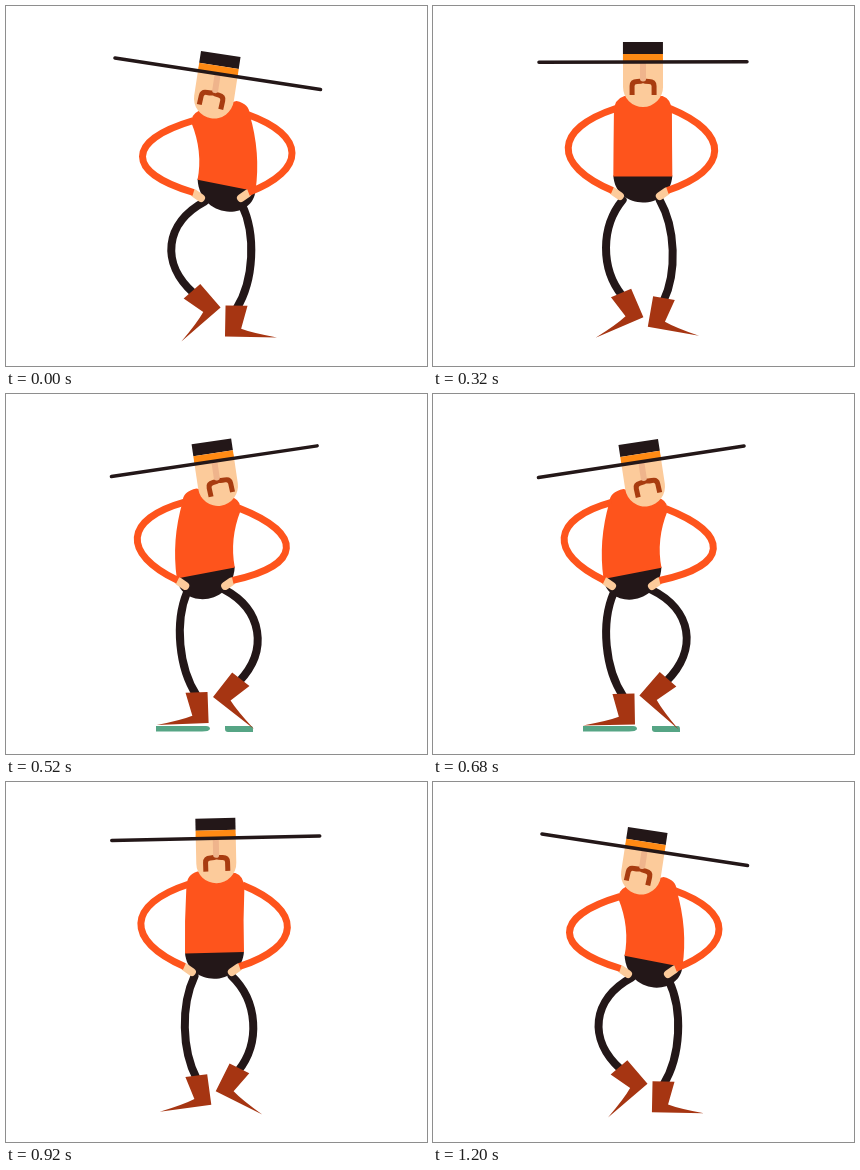
These frames come from a looping animation (421 px wide and 360 px high, 1.24 s). An HTML page:

```html
<!DOCTYPE html>
<html lang="en">
<head>
<meta charset="utf-8">
<title>Dancing man</title>
<style>
  html, body { margin: 0; width: 100%; height: 100%; overflow: hidden; background: #fff; }
  svg { display: block; width: 100vw; height: 100vh; }
  .arm, .leg, .hand { fill: none; }
  .arm { stroke: #fe541c; stroke-width: 7; }
  .hand { stroke: #fccb9b; stroke-width: 8; stroke-linecap: round; }
  .leg { stroke: #231718; stroke-width: 8; stroke-linecap: round; }
  .boot { fill: #a63512; }
  .pants { fill: #231718; }
  .torso { fill: #fe541c; }
  .shade { fill: #56a585; }
</style>
</head>
<body>
<svg viewBox="0 0 421 360">
  <path id="shadeR" class="shade" d="M230 334Q232 331.500 240 331.500H271V337H240Q232 337 230 334Z"/>
  <path id="shadeL" class="shade" d="M150 332H200Q204 332 204 335Q203 337.500 196 337.500H150ZM219 332H245Q247 332 247 335V338H222Q219 338 219 335Z"/>
  <g id="body"></g>
  <g id="head">
    <path fill="#fccb9b" d="M-20 -4H20V25A20 20 0 0 1 -20 25Z"/>
    <path fill="#231718" d="M-20 -20H20V-8H-20Z"/>
    <path fill="#ff8a14" d="M-20 -8H20V0H-20Z"/>
    <path id="mustache" fill="none" stroke="#a83c10" stroke-width="5" d="M-11 33V24Q-11 19.500 -6 19.500Q-2 19.500 0 18.500Q2 19.500 6 19.500Q11 19.500 11 24V33"/>
    <path fill="#efb48c" d="M-3 1H3V17Q3 19.500 0 19.500Q-3 19.500 -3 17Z"/>
    <path stroke="#231718" stroke-width="3.500" stroke-linecap="round" d="M-104 0H104"/>
  </g>
</svg>
<script>
const LOOP = 1240, STEP = 40, DELAY = 8, FOOT_LAG = 45;
const BOOT = 'M0 0L0 -31L22 -31L16 -8Q27 -4 52 0Z';
const SIDES = [-1, 1]; // left, right
const $ = id => document.getElementById(id);

function add(cls, d = '') {
  const el = document.createElementNS('http://www.w3.org/2000/svg', 'path');
  el.setAttribute('class', cls);
  el.setAttribute('d', d);
  $('body').append(el);
  return el;
}
const pair = (cls, d) => SIDES.map(() => add(cls, d));

const legs = pair('leg'), boots = pair('boot', BOOT);
const pants = add('pants'), torso = add('torso');
const hands = pair('hand'), arms = pair('arm');

// Lean of the body: 1 right, 0 upright, -1 left.
const lean = t => Math.sin(Math.PI / 2 * Math.cos(2 * Math.PI * (t - DELAY) / LOOP));
const set = (el, d) => el.setAttribute('d', d);
const move = (el, value) => el.setAttribute('transform', value);

// A curve from a to b that bulges outward by bow.
function limb([ax, ay], [bx, by], bow, side) {
  const dx = bx - ax, dy = by - ay;
  const k = side * bow * 4 / 3 / Math.hypot(dx, dy);
  const handle = f => `${ax + dx * f + dy * k} ${ay + dy * f - dx * k}`;
  return `M${ax} ${ay}C${handle(.28)} ${handle(.72)} ${bx} ${by}`;
}

function drawLeg(i, side, p, footLean) {
  const u = -side * footLean; // 1 lifted, -1 standing
  const deg = 16 + 20 * u + 5 * u * u, a = deg * Math.PI / 180;
  const heel = [210.5 + side * (2.2 - 6.3 * u), 316 - 14.5 * u];
  const ankle = [
    heel[0] + side * (11 * Math.cos(a) + 28 * Math.sin(a)),
    heel[1] + 11 * Math.sin(a) - 28 * Math.cos(a)
  ];
  const hip = [208.3 + 9 * p + side * 18.5, 194 + 3 * p * p + side * 1.5 * p];
  set(legs[i], limb(hip, ankle, 13 + 8 * u + 7 * u * u, side));
  move(boots[i], `translate(${heel}) scale(${side} 1) rotate(${deg})`);
}

function drawArm(i, side, p) {
  const u = -side * p;
  const shoulder = [210 + 4.5 * p + side * 27, 102.500 + 9 * p * p + 3 * u];
  const wrist = [207 + 8 * p + side * 27.5, 184.5 + 2 * p * p];
  set(arms[i], limb(shoulder, wrist, 46 + 3.5 * u + 1.5 * u * u, side));
  set(hands[i], `M${wrist[0] - side} ${wrist[1] + 1}l${-side * 6.5} 4.500`);
}

function drawTorso(p) {
  const q = p * p, tilt = 11 * p * Math.PI / 180;
  const midX = 210 + 10.5 * p, midY = 170.5 + 9 * q;
  const [left, right] = SIDES.map(s => ({
    x: 210 + 4.5 * p + s * 29, y: 106 + 6.5 * q - 4.5 * s * p,
    topX: 210.5 + p + s * 19, topY: 90 + 10 * q - 5 * s * p,
    waistX: midX + s * 29.5 * Math.cos(tilt), waistY: midY + s * 29.5 * Math.sin(tilt)
  }));
  const flank = e => `${(e.x + e.waistX) / 2 + 8.5 * p} ${(e.y + e.waistY) / 2}`;
  const corner = e => `${e.x} ${e.topY + 3}`;
  set(torso, `M${left.x} ${left.y}Q${corner(left)} ${left.topX} ${left.topY}
    L${right.topX} ${right.topY}Q${corner(right)} ${right.x} ${right.y}
    Q${flank(right)} ${right.waistX} ${right.waistY}
    L${left.waistX} ${left.waistY}Q${flank(left)} ${left.x} ${left.y}Z`);
  set(pants, `M${left.waistX} ${left.waistY - 1}L${right.waistX} ${right.waistY - 1}
    C${right.waistX - 2} ${midY + 35} ${left.waistX + 2} ${midY + 35} ${left.waistX} ${left.waistY - 1}Z`);
}

function draw(t) {
  const p = lean(t), footLean = lean(t - FOOT_LAG);
  SIDES.forEach((side, i) => {
    drawLeg(i, side, p, footLean);
    drawArm(i, side, p);
  });
  drawTorso(p);
  move($('head'), `translate(${210 + 1.75 * p} ${56 + 11.8 * p * p}) rotate(${8.7 * p})`);
  move($('mustache'), `translate(${-2 * p} ${p * p}) rotate(${4 * p} 0 24)`);
  $('shadeR').style.display = p > .5 && p < .985 ? '' : 'none';
  $('shadeL').style.display = p < -.4 ? '' : 'none';
}

const start = performance.now();
function tick() {
  const t = (performance.now() - start) % LOOP;
  draw(Math.floor(t / STEP) * STEP);
  requestAnimationFrame(tick);
}
tick();
</script>
</body>
</html>
```
